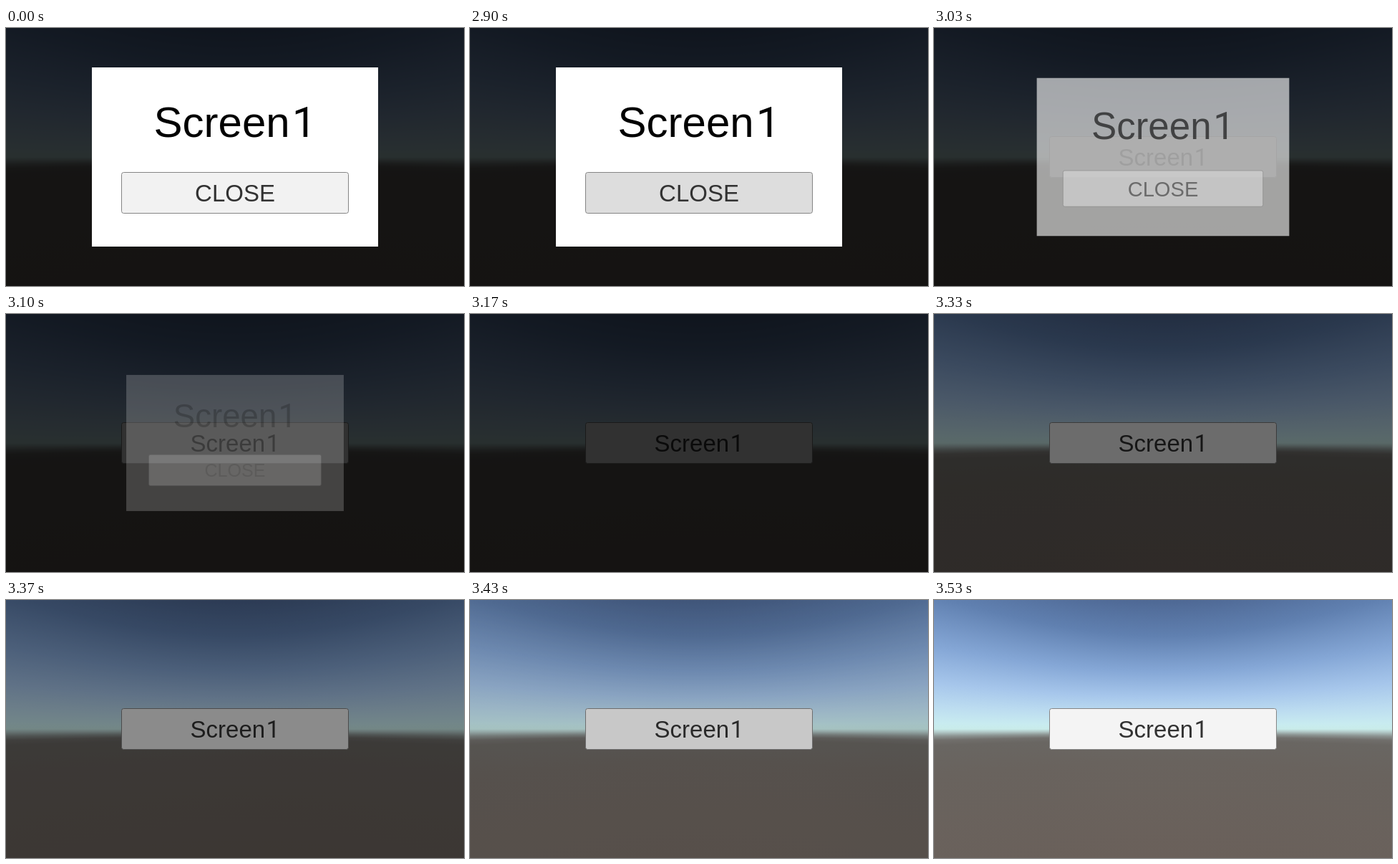
These frames come from a looping animation (640 px wide and 360 px high, 5570 ms). An HTML page with a canvas:

```html
<!DOCTYPE html>
<html lang="en">
<head>
<meta charset="utf-8">
<title>Dialog closing</title>
<style>
  html, body { margin: 0; width: 100%; height: 100%; overflow: hidden; background: #000; }
  #stage { position: relative; width: 640px; height: 360px; overflow: hidden; }
  canvas, svg { position: absolute; left: 0; top: 0; display: block; }
  text { font-family: "Liberation Sans", Arial, sans-serif; text-anchor: middle; fill: #323232; }
  .one { font-family: Roboto, sans-serif; }
  .button { stroke: #858585; stroke-width: 1; }
</style>
</head>
<body>
<div id="stage">
  <canvas id="sky" width="640" height="360"></canvas>
  <svg width="640" height="360" viewBox="0 0 640 360">
    <rect class="button" x="161.5" y="151.5" width="317" height="57" rx="3" fill="#f4f4f4"/>
    <text x="320" y="192" font-size="33">Screen<tspan class="one" dx=".05em">1</tspan></text>
    <rect id="shade" width="640" height="360"/>
    <g id="dialog">
      <rect x="120" y="55" width="400" height="250" fill="#fff"/>
      <text x="320" y="151.7" font-size="60" style="fill:#000">Screen<tspan class="one" dx=".05em">1</tspan></text>
      <rect id="close" class="button" x="161.5" y="201.5" width="317" height="57" rx="3"/>
      <text x="320" y="242" font-size="33">CLOSE</text>
    </g>
  </svg>
</div>
<script>
const LOOP = 5570;
const STEP = 100 / 3;
const $ = id => document.getElementById(id);
const shade = $('shade'), dialog = $('dialog'), closeButton = $('close');
const parts = [...dialog.children];

const clamp = u => Math.min(1, Math.max(0, u));
const ramp = (t, start, length) => clamp((t - start) / length);
const smooth = u => u * u * (3 - 2 * u);

// Sky colours down the middle column; lines of equal elevation bend outwards.
function paintSky() {
  const stops = [
    [0, '#4e6894'], [50, '#6080b0'], [100, '#85a7d6'], [135, '#a6c6eb'],
    [158, '#bcdcf0'], [174, '#c8ebf0'], [180, '#c9ecea'], [183, '#b3cac9'],
    [187, '#8c9492'], [191, '#716f6c'], [196, '#696662'], [225, '#69635e'],
    [360, '#6a605a']
  ];
  const ctx = $('sky').getContext('2d');
  const focal = 180 / Math.tan(Math.PI / 6);
  for (let x = 0; x < 640; x++) {
    const reach = 180 * Math.hypot(1, (x - 319.5) / focal);
    const column = ctx.createLinearGradient(0, 180 - reach, 0, 180 + reach);
    for (const [y, color] of stops) column.addColorStop(y / 360, color);
    ctx.fillStyle = column;
    ctx.fillRect(x, 0, 1, 360);
  }
}

function render(time) {
  const t = Math.floor((time + 4) / STEP) * STEP;

  const alpha = 1 - smooth(ramp(t, 2933, 234));
  const scale = 0.7 + 0.3 * alpha;
  dialog.setAttribute('transform', `translate(320 180) scale(${scale}) translate(-320 -180)`);
  dialog.setAttribute('visibility', alpha > 0 ? 'visible' : 'hidden');
  for (const part of parts) part.setAttribute('opacity', alpha);

  const pressed = ramp(t, 2867, 66) - ramp(t, 2990, 100);
  const tone = Math.round(242 - 42 * pressed);
  closeButton.setAttribute('fill', `rgb(${tone},${tone},${tone})`);

  shade.setAttribute('opacity', 0.8 * (1 - smooth(ramp(t, 3222, 305))));
}

const origin = performance.now();
function tick() {
  render((performance.now() - origin) % LOOP);
  requestAnimationFrame(tick);
}

paintSky();
tick();
</script>
</body>
</html>
```
